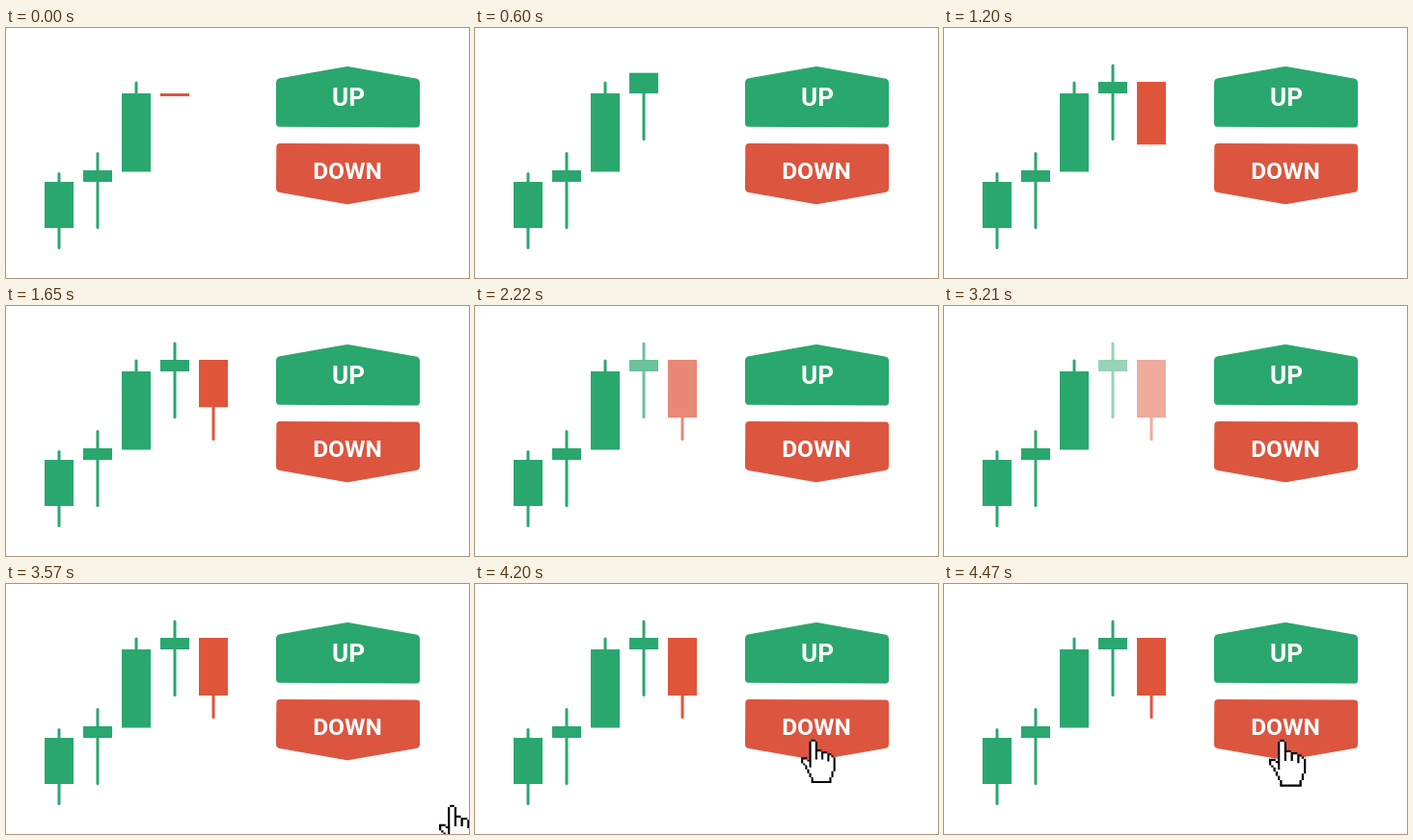
Recreate the animation shown at these times as an HTML page. Size 480x260 px, loop 4.8 s.

```html
<!DOCTYPE html>
<html lang="en">
<head>
<meta charset="utf-8">
<title>Up or down</title>
<style>
  html, body { margin: 0; width: 100%; height: 100%; overflow: hidden; background: #fff; }
  svg { display: block; width: 480px; height: 260px; }
  text { font-family: Roboto, Arial, sans-serif; font-weight: 700; fill: #fff; text-anchor: middle; }
  .up { fill: #2aa76e; }
  .down { fill: #df553a; }
  .sell { fill: #dc553f; }
</style>
</head>
<body>
<svg viewBox="0 0 480 260">
  <g id="past"></g>
  <g id="live"></g>
  <g>
    <path class="up" d="M280 57Q280 53 284 52.3L352 40.3Q354 39.9 356 40.3L425 52.6Q429 53.3 429 57V100Q429 103.4 425.5 103.4L283.5 102.7Q280 102.7 280 99Z"/>
    <text x="355" y="81" font-size="26">UP</text>
  </g>
  <g id="sell">
    <path class="sell" d="M280.3 124Q280.3 120 284 120L425.5 120.6Q429 120.6 429 124V166.500Q429 170.300 425 171L356 183Q354 183.400 352 183L283.700 171Q280 170.300 280 166.500Z"/>
    <text x="354" y="156.500" font-size="24.500">DOWN</text>
  </g>
  <g id="hand">
    <path d="M5 0h2v1h1v4h2v1h3v1h2v1h1v1h1v7h-1v3h-1v3h-10v-3h-1v-2h-1v-2h-1v-2h-1v-1h-1v-3h3v1h1v-9h1z"/>
    <path fill="#fff" d="M5 1h2v9.100h-2zM8 6h2v4.100h-2zM11 7h2v4.100h-2zM14 8h1v1h1v2.100h-2zM5 10h8v1h3v5h-1v3h-1v2h-8v-2h-1v-2h-1v-2h-1v-2h-1v-1h-1v-2h2v1h1v3h1z"/>
  </g>
</svg>
<script>
const LOOP = 4800, STEP = 30;
const $ = id => document.getElementById(id);

// Price paths as [time, y]
const PRICES = [
  { x: 160, open: 68, path: [[0, 71], [255, 117], [645, 37.5], [870, 56]] },
  { x: 200, open: 56, path: [[870, 56], [1295, 140], [1625, 103], [1770, 116]] }
];
const BLINKS = [[2070, 2670], [3000, 3570]];

function rect(parent) {
  const r = document.createElementNS("http://www.w3.org/2000/svg", "rect");
  parent.append(r);
  return r;
}

function set(node, attrs) {
  for (const key in attrs) node.setAttribute(key, attrs[key]);
}

function makeCandle(parent, x) {
  const wick = rect(parent), body = rect(parent);
  set(wick, { x: x + 13.5, width: 3, rx: 1.5 });
  set(body, { x, width: 30 });
  return (open, close, high, low) => {
    const cls = close < open ? "up" : "down";
    const height = Math.max(3, Math.abs(close - open));
    set(wick, { y: high, height: low - high, class: cls });
    set(body, { y: Math.min(open, close), height, class: cls });
  };
}

function along(points, t) {
  let i = 1;
  while (i < points.length - 1 && t > points[i][0]) i++;
  const [t0, a] = points[i - 1], [t1, b] = points[i];
  const p = Math.min(1, Math.max(0, (t - t0) / (t1 - t0)));
  return a + (b - a) * p;
}

// 0 at both ends, 1 in the middle
function pulse(t, start, end) {
  if (t <= start || t >= end) return 0;
  return (1 - Math.cos(2 * Math.PI * (t - start) / (end - start))) / 2;
}

// open, close, high, low
[[40, 208, 160, 150, 230], [80, 160, 148, 129, 209], [120, 149.5, 68, 55.5, 149]]
  .forEach(([x, ...prices]) => makeCandle($("past"), x)(...prices));

const live = PRICES.map(p => {
  const group = document.createElementNS("http://www.w3.org/2000/svg", "g");
  $("live").append(group);
  return { ...p, group, draw: makeCandle(group, p.x) };
});

function drawLive(t) {
  for (const { group, draw, open, path } of live) {
    group.style.display = t < path[0][0] ? "none" : "";
    const close = along(path, t);
    const seen = path.filter(p => p[0] <= t).map(p => p[1]).concat(open, close);
    draw(open, close, Math.min(...seen), Math.max(...seen));
  }
  const dim = BLINKS.reduce((sum, [a, b]) => sum + pulse(t, a, b), 0);
  $("live").style.opacity = 1 - 0.61 * dim;
}

function drawHand(t) {
  $("hand").style.display = t < 3390 ? "none" : "";
  const x = along([[3390, 497], [3990, 337]], t);
  const y = along([[3390, 258.8], [3990, 161.8]], t);
  const away = 1 - along([[4170, 0], [4320, 1], [4470, 0]], t);
  const k = 1 - 0.2 * (1 - away * away);
  set($("hand"), {
    transform: `translate(${x + 16 * (1 - k)} ${y}) scale(${2.25 * k} ${2.22 * k})`
  });
  $("sell").style.opacity = 1 - 0.25 * pulse(t, 4200, 4470);
}

function frame() {
  const now = performance.now() % LOOP;
  const t = now - now % STEP;
  drawLive(t);
  drawHand(t);
  requestAnimationFrame(frame);
}
frame();
</script>
</body>
</html>
```
